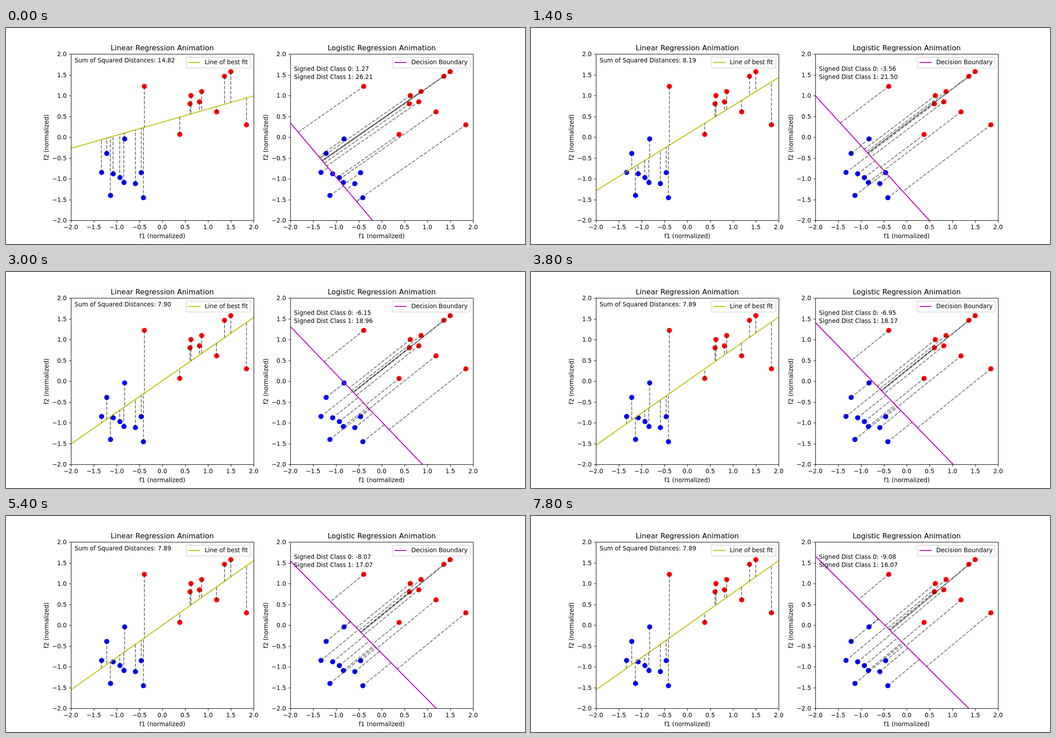
These frames come from a looping animation (1159 px wide and 483 px high, 8000 ms). An HTML page with a canvas:

```html
<!DOCTYPE html>
<html lang="en">
<head>
<meta charset="utf-8">
<title>Regression animation</title>
<style>
  html, body { margin: 0; width: 100%; height: 100%; overflow: hidden; background: #fff; }
  canvas { display: block; }
</style>
</head>
<body>
<canvas id="stage" width="1159" height="483"></canvas>
<script>
const ctx = document.getElementById('stage').getContext('2d');

const STEP_MS = 200, STEPS = 40;
const PT = 483 / 360;                       // pixels per typographic point
const TOP = 58.46, HEIGHT = 371.91, WIDTH = 408.28, BOTTOM = TOP + HEIGHT;
const LEFT_AXES = 144.875, RIGHT_AXES = 634.82;
const SMALL = 10 * PT, LARGE = 12 * PT;

const RED = [
  [-.392, 1.225], [.607, .806], [.627, 1.005], [.862, 1.101], [.813, .854],
  [.382, .069], [1.19, .612], [1.361, 1.467], [1.499, 1.58], [1.842, .3]
];
const BLUE = [
  [-1.328, -.845], [-1.215, -.388], [-1.132, -1.399], [-1.073, -.878], [-.926, -.969],
  [-.838, -1.087], [-.823, -.039], [-.588, -1.114], [-.461, -.851], [-.412, -1.453]
];
const POINTS = [...BLUE, ...RED];

// Sum of all signed distances to the decision boundary at some steps.
const DISTANCE_SUMS = [
  [0, 27.48], [7, 17.94], [11, 14.95], [15, 12.81], [23, 9.99], [31, 8.21], [39, 6.99]
];

// The reciprocal grows almost linearly, so a local cubic describes it well.
function meanDistance(step) {
  const next = DISTANCE_SUMS.findIndex(([k]) => k >= step);
  const start = Math.max(0, Math.min(DISTANCE_SUMS.length - 4, next - 2));
  const knots = DISTANCE_SUMS.slice(start, start + 4);
  let reciprocal = 0;
  for (const [k, sum] of knots) {
    let weight = 20 / sum;
    for (const [other] of knots) if (other !== k) weight *= (step - other) / (k - other);
    reciprocal += weight;
  }
  return 1 / reciprocal;
}

const toX = (left, x) => left + (x + 2) / 4 * WIDTH;
const toY = y => TOP + (2 - y) / 4 * HEIGHT;
const crisp = v => Math.round(v) + .5;

function text(string, x, y, size = SMALL, align = 'left') {
  ctx.font = `${size}px "DejaVu Sans", sans-serif`;
  ctx.textAlign = align;
  ctx.fillStyle = '#000';
  ctx.fillText(string, x, y);
}

function line(x1, y1, x2, y2, color, width = 1.5 * PT) {
  ctx.strokeStyle = color;
  ctx.lineWidth = width;
  ctx.beginPath();
  ctx.moveTo(x1, y1);
  ctx.lineTo(x2, y2);
  ctx.stroke();
}

function dashed(x1, y1, x2, y2) {
  ctx.setLineDash([5.55 * PT, 2.4 * PT]);
  line(x1, y1, x2, y2, 'rgba(0,0,0,.5)');
  ctx.setLineDash([]);
}

function dots(left, points, color) {
  ctx.fillStyle = color;
  for (const [x, y] of points) {
    ctx.beginPath();
    ctx.arc(toX(left, x), toY(y), 5.75, 0, 2 * Math.PI);
    ctx.fill();
  }
}

function axes(left, title) {
  const center = left + WIDTH / 2, thin = .8 * PT, tick = 3.5 * PT;
  const x0 = crisp(left), x1 = crisp(left + WIDTH);
  const y0 = crisp(TOP), y1 = crisp(BOTTOM);
  ctx.strokeStyle = '#000';
  ctx.lineWidth = thin;
  ctx.strokeRect(x0, y0, x1 - x0, y1 - y0);
  for (let v = -2; v <= 2; v += .5) {
    const label = v.toFixed(1).replace('-', '\u2212');
    const x = crisp(toX(left, v)), y = crisp(toY(v));
    line(x, y1, x, y1 + tick, '#000', thin);
    line(x0 - tick, y, x0, y, '#000', thin);
    text(label, toX(left, v), 450, SMALL, 'center');
    text(label, left - 2 * tick, Math.round(toY(v) + 4.9), SMALL, 'right');
  }
  text(title, center, 50, LARGE, 'center');
  text('f1 (normalized)', center, 470, SMALL, 'center');
  ctx.save();
  ctx.translate(Math.round(left - 50), TOP + HEIGHT / 2);
  ctx.rotate(-Math.PI / 2);
  text('f2 (normalized)', 0, 0, SMALL, 'center');
  ctx.restore();
}

function legend(textX, axesLeft, label, color) {
  const handle = textX - 2.8 * SMALL;
  const boxLeft = crisp(handle - .4 * SMALL);
  const boxRight = crisp(axesLeft + WIDTH - .5 * SMALL);
  ctx.beginPath();
  ctx.roundRect(boxLeft, 65.5, boxRight - boxLeft, 24, .2 * SMALL);
  ctx.fillStyle = 'rgba(255,255,255,.8)';
  ctx.fill();
  ctx.strokeStyle = 'rgba(204,204,204,.8)';
  ctx.lineWidth = PT;
  ctx.stroke();
  line(handle, 77, handle + 2 * SMALL, 77, color);
  text(label, Math.floor(textX), 81);
}

function plot(left, title, drawLines) {
  ctx.save();
  ctx.beginPath();
  ctx.rect(left, TOP, WIDTH, HEIGHT);
  ctx.clip();
  dots(left, BLUE, '#00f');
  dots(left, RED, '#f00');
  drawLines();
  ctx.restore();
  axes(left, title);
}

function linearPlot(step) {
  const left = LEFT_AXES, decay = .8 ** step;
  const fit = x => (.778 - .4625 * decay) * x + .364 * decay;
  plot(left, 'Linear Regression Animation', () => {
    line(toX(left, -2), toY(fit(-2)), toX(left, 2), toY(fit(2)), '#bfbf00');
    for (const [x, y] of POINTS) {
      const px = Math.round(toX(left, x));
      dashed(px, Math.round(toY(y)), px, Math.round(toY(fit(x))));
    }
  });
  const squares = 7.89 + 6.93 * decay * decay;
  text(`Sum of Squared Distances: ${squares.toFixed(2)}`, Math.round(left + .02 * WIDTH), 77);
  legend(444.5, left, 'Line of best fit', '#bfbf00');
}

function logisticPlot(step) {
  const left = RIGHT_AXES, d = meanDistance(step);
  const slope = 1.0253 + .1809 * d + .0165 * d * d;
  const norm = Math.hypot(slope, 1), nx = slope / norm, ny = 1 / norm;
  const boundary = x => -slope * x - d * norm;
  plot(left, 'Logistic Regression Animation', () => {
    line(toX(left, -2), toY(boundary(-2)), toX(left, 2), toY(boundary(2)), '#bf00bf');
    for (const [x, y] of POINTS) {
      const distance = nx * x + ny * y + d;
      dashed(toX(left, x), toY(y), toX(left, x - distance * nx), toY(y - distance * ny));
    }
  });
  const spread = 12.606 - .072 * d - .0195 * d * d;
  const textX = Math.round(left + .02 * WIDTH);
  text(`Signed Dist Class 0: ${(10 * d - spread).toFixed(2)}`, textX, 96);
  text(`Signed Dist Class 1: ${(10 * d + spread).toFixed(2)}`, textX, 114);
  legend(905, left, 'Decision Boundary', '#bf00bf');
}

function draw(now) {
  const step = Math.floor(now / STEP_MS) % STEPS;
  ctx.fillStyle = '#fff';
  ctx.fillRect(0, 0, 1159, 483);
  linearPlot(step);
  logisticPlot(step);
  requestAnimationFrame(draw);
}
draw(0);
</script>
</body>
</html>
```
